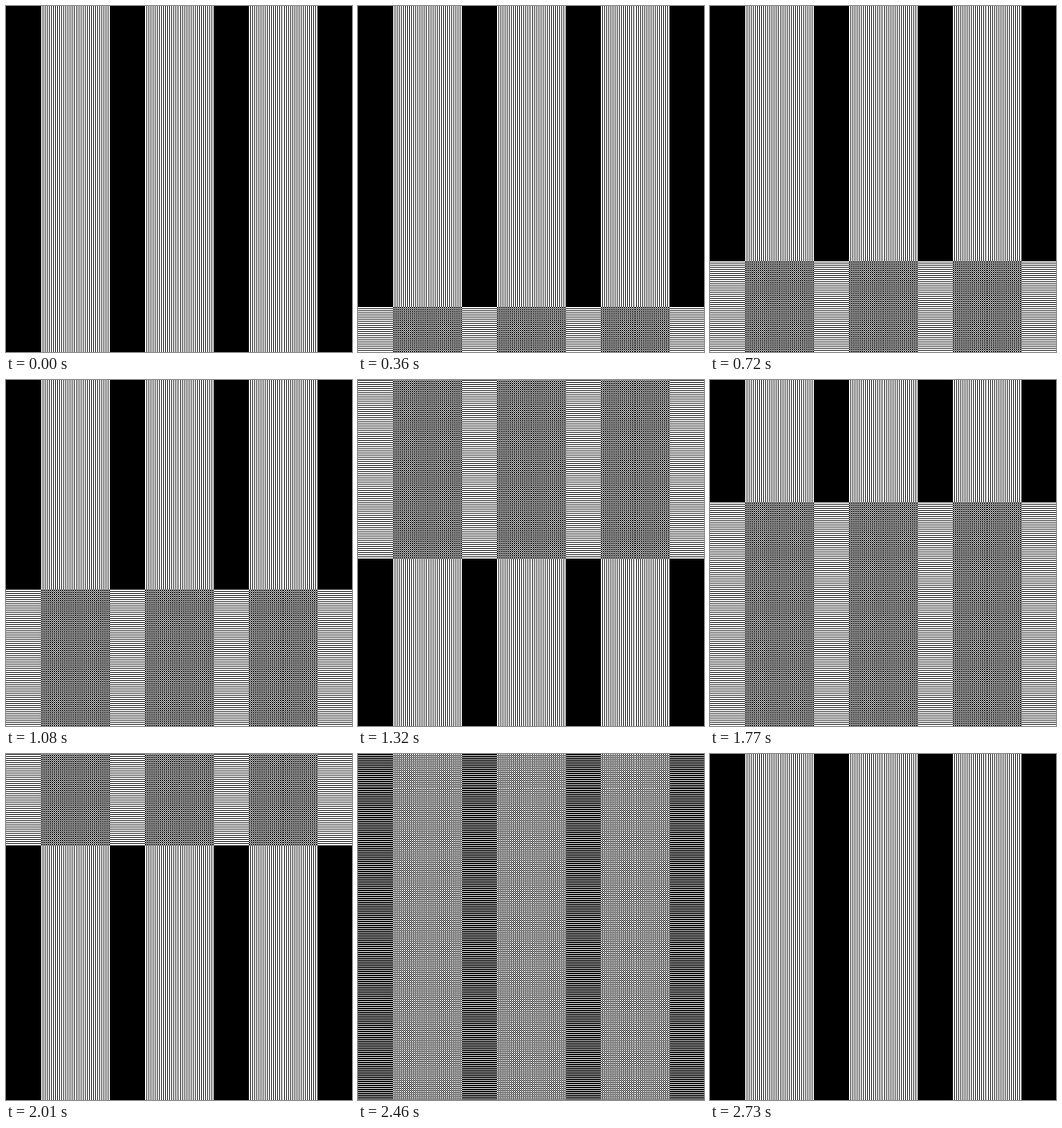
An HTML page with a canvas that plays this animation: 500 px wide and 500 px high, repeating every 2.76 s.

```html
<!DOCTYPE html>
<html lang="en">
<head>
<meta charset="utf-8">
<title>Moving stripe moiré</title>
<style>
  html, body { margin: 0; width: 100%; height: 100%; overflow: hidden; background: #000; }
  canvas { display: block; width: 100%; height: 100%; image-rendering: pixelated; }
</style>
</head>
<body>
<canvas id="stage" width="500" height="500"></canvas>
<script>
const SIZE = 500, BAR = 3, STRIP = 50;
const STEP = 30, STEPS = 92;
const ctx = document.getElementById('stage').getContext('2d');

const stripe = pos => Math.floor(pos / BAR) % 2;

// Each axis is the difference of two stripe layers:
// columns restart in every strip, rows scroll up and wrap.
const columnLit = x => stripe(x) !== stripe(x % STRIP);
const rowLit = (y, shift) => stripe(y) !== stripe((y + shift) % SIZE);

function draw(step) {
  const shift = Math.round(SIZE * step / (STEPS - 1));
  ctx.globalCompositeOperation = 'source-over';
  ctx.fillStyle = '#000';
  ctx.fillRect(0, 0, SIZE, SIZE);
  ctx.globalCompositeOperation = 'difference';
  ctx.fillStyle = '#fff';
  for (let i = 0; i < SIZE; i++) {
    if (columnLit(i)) ctx.fillRect(i, 0, 1, SIZE);
    if (rowLit(i, shift)) ctx.fillRect(0, i, SIZE, 1);
  }
}

const start = performance.now();
let shown = -1;

function tick() {
  const step = Math.floor((performance.now() - start) / STEP) % STEPS;
  if (step !== shown) draw(shown = step);
  requestAnimationFrame(tick);
}
tick();
</script>
</body>
</html>
```
